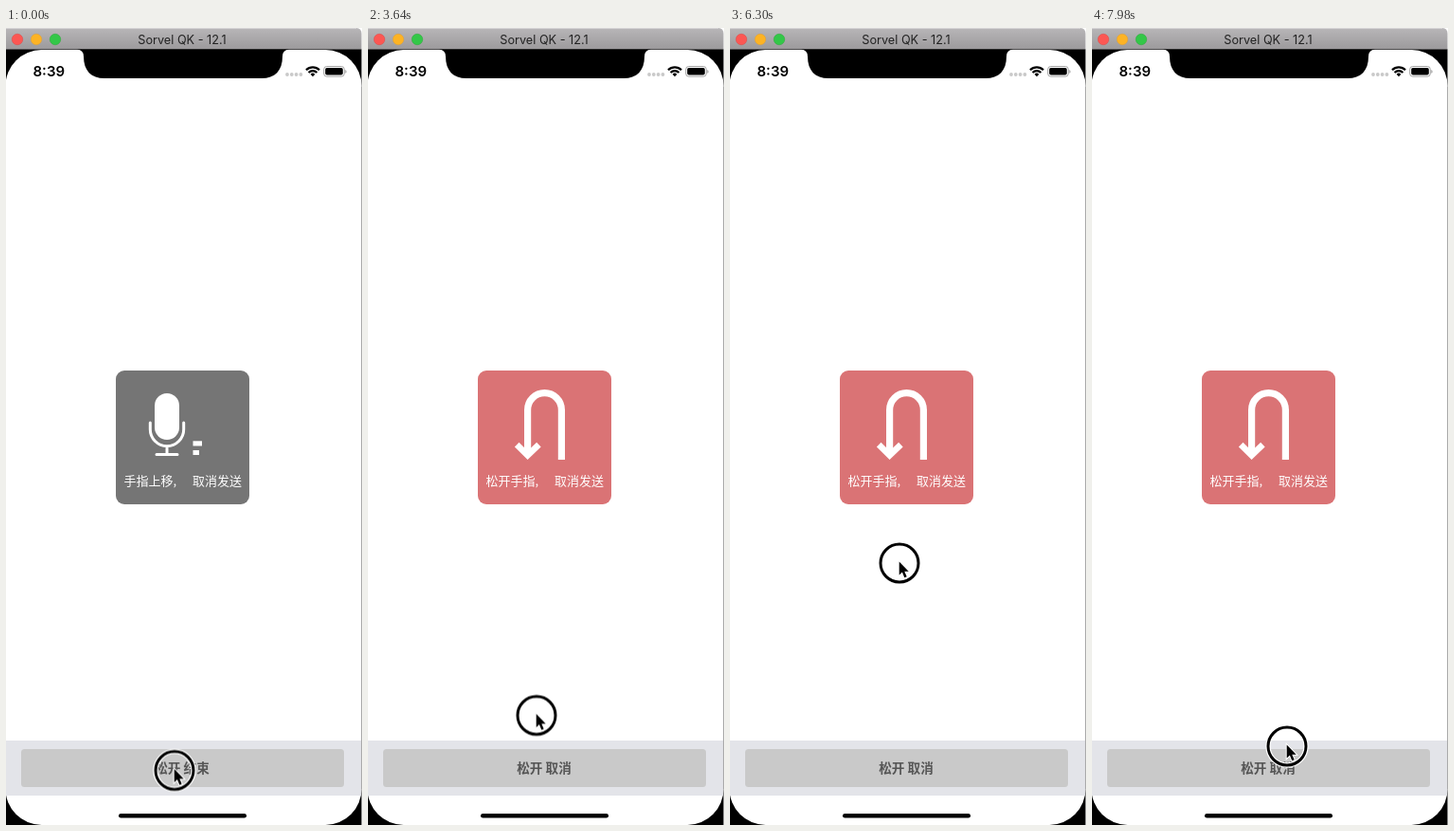
These frames come from a looping animation (376 px wide and 840 px high, 8 s). An HTML page:

```html
<!DOCTYPE html>
<html lang="zh">
<head>
<meta charset="utf-8">
<title>Hold to talk</title>
<style>
  html, body { margin: 0; width: 100%; height: 100%; overflow: hidden; background: #fff; }
  svg { display: block; width: 376px; height: 840px; }
  .cjk { font-family: "Noto Sans CJK SC", "Noto Sans CJK", sans-serif; }
  .latin { font-family: Inter, "Open Sans", sans-serif; }
  .tip { font-size: 13px; fill: #fff; }
  .label { font-size: 13.6px; font-weight: 700; fill: #555; }
  .line { fill: none; stroke: #fff; }

  .talk, .cancel, .bar2, .bar3 { animation: 8s step-end infinite; }
  .talk { animation-name: talk; }
  .cancel { animation-name: cancel; }
  .bar2 { animation-name: bar2; }
  .bar3 { animation-name: bar3; }
  .finger { animation: finger 8s linear infinite; }

  @keyframes talk { 0% { opacity: 1; } 43.6%, 100% { opacity: 0; } }
  @keyframes cancel { 0% { opacity: 0; } 43.6%, 100% { opacity: 1; } }
  @keyframes bar2 {
    0%, 10.75%, 21.25%, 31.75%, 42.25% { opacity: 1; }
    5%, 17.25%, 27.75%, 38.25% { opacity: 0; }
    100% { opacity: 1; }
  }
  @keyframes bar3 {
    0%, 17.25%, 27.75%, 38.25%, 100% { opacity: 0; }
    15.75%, 26.25%, 36.5% { opacity: 1; }
  }
  @keyframes finger {
    0% { transform: translate(178px, 782.5px); }
    40.5% { transform: translate(178px, 782.5px); animation-timing-function: cubic-bezier(.4, 0, .7, .8); }
    50.5% { transform: translate(178px, 628px); }
    51%, 52.25% { transform: translate(178px, 618px); }
    59.75% { transform: translate(178px, 607px); }
    65%, 66.25% { transform: translate(178px, 585px); }
    70.25% { transform: translate(178px, 575px); }
    78.75% { transform: translate(179px, 564px); }
    80.75% { transform: translate(179px, 563px); animation-timing-function: cubic-bezier(.5, 0, .8, .6); }
    89% { transform: translate(187px, 626px); }
    91.25% { transform: translate(201px, 702px); animation-timing-function: cubic-bezier(.2, .5, .6, 1); }
    99.75%, 100% { transform: translate(206px, 757px); }
  }
</style>
</head>
<body>
<svg viewBox="0 0 376 840" xmlns="http://www.w3.org/2000/svg">
  <defs>
    <linearGradient id="chrome" x2="0" y2="1">
      <stop offset="0" stop-color="#b8b6b8"/>
      <stop offset="1" stop-color="#9b999b"/>
    </linearGradient>
  </defs>

  <!-- window -->
  <path d="M0 0H370Q375.5 0 375.5 6V23H0Z" fill="url(#chrome)"/>
  <path d="M0 .5H370" stroke="#d2d0d2"/>
  <circle cx="12" cy="12" r="5.75" fill="#fc5753" stroke="#df4744" stroke-width=".5"/>
  <circle cx="32" cy="12" r="5.75" fill="#fdb324" stroke="#de9f34" stroke-width=".5"/>
  <circle cx="52" cy="12" r="5.75" fill="#33c748" stroke="#27aa35" stroke-width=".5"/>
  <text class="latin" x="186" y="17" font-size="12.7" text-anchor="middle" fill="#222">Sorvel QK - 12.1</text>

  <!-- phone -->
  <path d="M0 22.5H375.5V840H0Z"/>
  <rect x="-.5" y="23" width="376" height="817" rx="38" fill="#fff"/>
  <path d="M75 22.5Q82 23 82 30C82 45 90 53 104 53H270C284 53 292 45 292 30Q292 23 299 22.5Z"/>
  <path d="M375.5 62V802" stroke="#aaa"/>

  <!-- status -->
  <text class="latin" x="28.5" y="51" font-size="15" font-weight="600">8:39</text>
  <g fill="#c9c9c9">
    <circle cx="297" cy="49" r="1.9"/><circle cx="301.8" cy="49" r="1.9"/>
    <circle cx="306.6" cy="49" r="1.9"/><circle cx="311.4" cy="49" r="1.9"/>
  </g>
  <g fill="none" stroke="#000" stroke-width="2.2">
    <path d="M317 44.2A10 10 0 0 1 331 44.2"/>
    <path d="M319.6 47A6.2 6.2 0 0 1 328.4 47"/>
  </g>
  <path d="M321.6 48.8A3.4 3.4 0 0 1 326.4 48.8L324 51.3Z"/>
  <rect x="335.7" y="40.5" width="21.6" height="10.6" rx="3" fill="none" stroke="#999" stroke-width=".9"/>
  <rect x="337.2" y="42" width="18.6" height="7.6" rx="1.8"/>
  <path d="M358.3 44V47.8Q359.6 47.2 359.6 45.9T358.3 44Z" fill="#999"/>

  <!-- footer -->
  <path d="M0 751H375V809H0Z" fill="#e3e4e9"/>
  <rect x="16" y="760" width="341" height="40" rx="3.5" fill="#c9c9c9"/>
  <rect x="119" y="828" width="135" height="4.6" rx="2.3"/>

  <g class="talk">
    <rect x="116" y="361" width="141" height="141" rx="9" fill="#757575"/>
    <rect x="157" y="385" width="26" height="49" rx="13" fill="#fff"/>
    <path class="line" stroke-width="3" stroke-linecap="round" d="M152.3 416V423A17.7 17.7 0 0 0 187.7 423V416M170 441V449M159 449.5H181"/>
    <g fill="#fff">
      <path d="M197.5 445H204V450H197.5Z"/>
      <path class="bar2" d="M197.5 435.3H207V440.5H197.5Z"/>
      <path class="bar3" d="M197.5 426.3H210V431.5H197.5Z"/>
    </g>
    <text class="cjk tip" x="124.5" y="482">手指上移,</text>
    <text class="cjk label" x="186" y="785" text-anchor="middle">松开 结束</text>
  </g>

  <g class="cancel">
    <rect x="116" y="361" width="141" height="141" rx="9" fill="#da7375"/>
    <path class="line" stroke-width="7.2" d="M204.4 455V402.5A17.9 17.9 0 0 0 168.6 402.5V449"/>
    <path class="line" stroke-width="6.6" d="M157.2 439.2L168.6 450.4L180.4 439.2"/>
    <text class="cjk tip" x="124.5" y="482">松开手指,</text>
    <text class="cjk label" x="186" y="785" text-anchor="middle">松开 取消</text>
  </g>
  <text class="cjk tip" x="197" y="482">取消发送</text>

  <g class="finger">
    <circle r="20" fill="none" stroke="#fff" stroke-width="5.4"/>
    <circle r="20" fill="none" stroke="#000" stroke-width="3"/>
    <path d="M-.3-1.6V12.6L2.9 9.6L5.3 15.2L7.7 14.2L5.3 8.7H9.7Z" stroke="#fff" stroke-width="2" paint-order="stroke"/>
  </g>
</svg>
</body>
</html>
```
